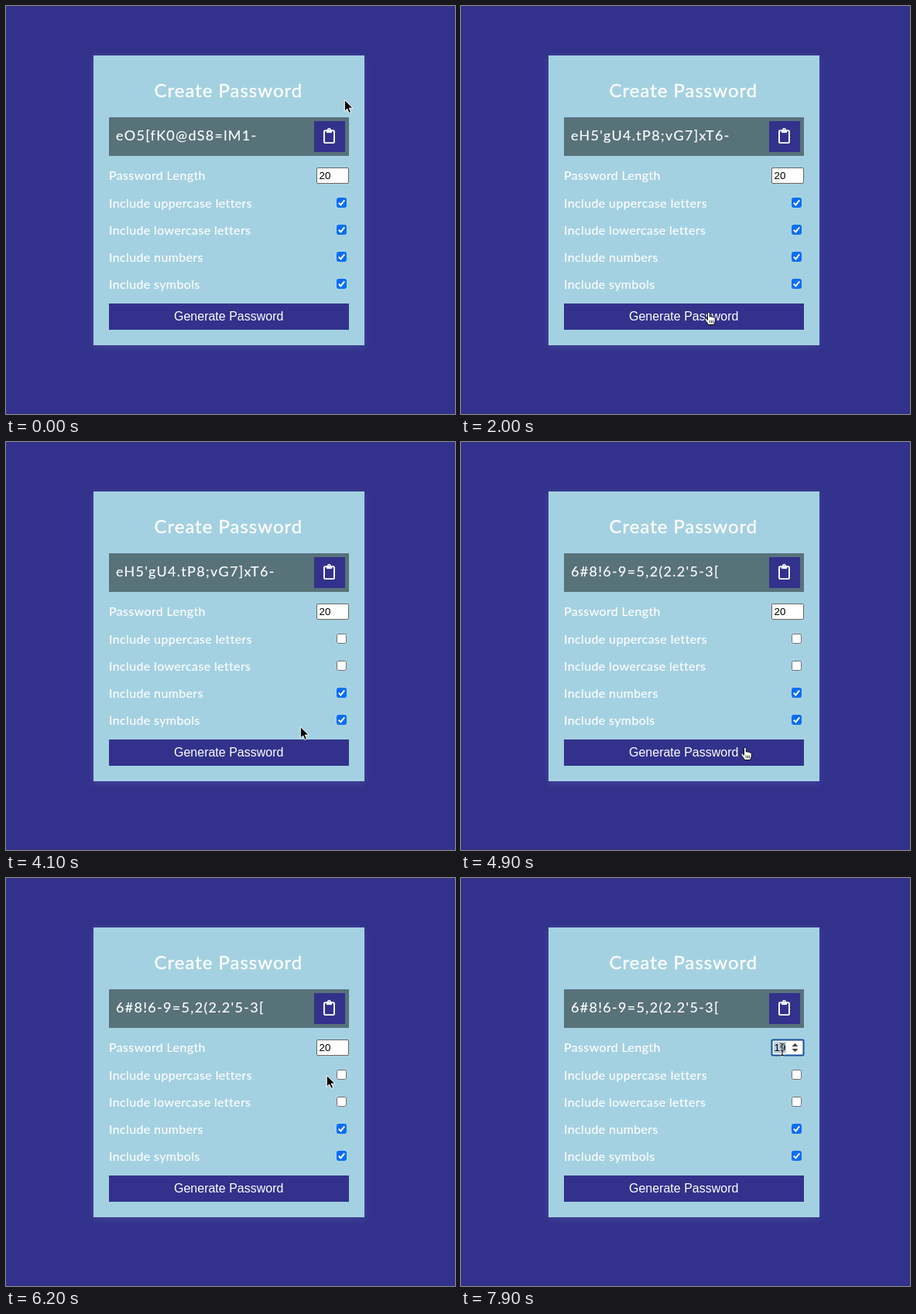
An HTML page that plays this animation: 580 by 528 pixels, repeating every 8 s.

```html
<!DOCTYPE html>
<html lang="en">
<head>
<meta charset="utf-8">
<title>Create Password</title>
<style>
  html, body { margin: 0; width: 100%; height: 100%; overflow: hidden; background: #32328c; }
  svg { display: block; }
  text { white-space: pre; }
  .card { fill: #a4d1e2; filter: drop-shadow(0 2px 5px rgba(255, 255, 255, .1)); }
  .navy { fill: #32328c; }
  .sans { font-family: Lato, "Open Sans", sans-serif; fill: #fff; }
  .title { font-size: 24px; letter-spacing: 1px; stroke: #fff; stroke-width: .35px; }
  .label { font-size: 16px; letter-spacing: .37px; stroke: #fff; stroke-width: .15px; }
  .password { font-size: 18px; letter-spacing: 1.3px; stroke: #fff; stroke-width: .15px; }
  .button { font: 16px "Liberation Sans", Arial, sans-serif; fill: #fff; }
  .number { font: 13.333px "Liberation Sans", Arial, sans-serif; fill: #000; }
</style>
</head>
<body>
<svg width="580" height="528" viewBox="0 0 580 528">
  <rect class="navy" width="580" height="528"/>
  <rect class="card" x="113" y="64" width="350" height="375"/>
  <text class="sans title" x="191.5" y="118">Create Password</text>

  <rect x="133" y="144" width="310" height="50" fill="#58727a"/>
  <text id="password" class="sans password" x="142" y="174"></text>
  <rect class="navy" x="398" y="149" width="40" height="40"/>
  <g fill="none" stroke="#fff">
    <rect x="411" y="161.3" width="13" height="15.8" rx="1.2" stroke-width="1.9"/>
    <path d="M414 162.6h7" stroke-width="3"/>
    <circle cx="417.5" cy="160.2" r="1.7" stroke-width="1.6"/>
  </g>

  <g id="labels" class="sans label"></g>

  <rect id="field" x="401.5" y="209.5" width="41" height="20" rx="1.5" fill="#fff" stroke="#666"/>
  <rect id="selection" x="404" y="212" width="16" height="15" fill="#b9cfe4"/>
  <text id="number" class="number" x="404.5" y="224"></text>
  <g id="spinner">
    <rect id="spinHover" x="425" y="212" width="15" height="15" fill="#d9d9d9"/>
    <path d="M427.5 218l4-4.2 4 4.2zM427.5 221l4 4.2 4-4.2z" fill="#444"/>
  </g>

  <g id="boxes"></g>

  <rect class="navy" x="133" y="385" width="310" height="34"/>
  <text class="button" x="217" y="407">Generate Password</text>

  <g id="cursor">
    <path id="arrow" d="M.3 .5V15.2L3.7 12L6.1 17.4L8.6 16.3L6.2 11.1H11Z"
      fill="#000" stroke="#fff" stroke-width="1" stroke-linejoin="round"/>
    <g id="hand" fill="#fff" stroke="#000" stroke-linejoin="round" stroke-linecap="round">
      <path d="M-1.5 9V.6C-1.5-1.2 1.2-1.2 1.3.6V5.2C1.8 4.2 3.6 4.4 3.8 5.6C4.4 4.7 6.1 5 6.2 6.3C7 5.6 8.3 6.1 8.3 7.4V10.3C8.3 12 7.1 13 6.9 15.5H-.6C-1.4 13-4.7 10.2-5.2 8.4C-5.4 6.9-3.6 6.7-2.8 7.6Z"/>
      <path d="M1.3 10v3M3.5 10v3M5.6 10v3" stroke-width=".8"/>
    </g>
    <g id="beam" fill="none">
      <path d="M-3-8Q0-8 0-6Q0-8 3-8M0-6V6M-3 8Q0 8 0 6Q0 8 3 8M-1.5 2H1.5" stroke="#fff" stroke-width="2.4"/>
      <path d="M-3-8Q0-8 0-6Q0-8 3-8M0-6V6M-3 8Q0 8 0 6Q0 8 3 8M-1.5 2H1.5" stroke="#000" stroke-width="1.1"/>
    </g>
  </g>
</svg>
<script>
const LOOP = 8000, STEP = 100;
const $ = id => document.getElementById(id);

// [time, value]: each value holds until the next time
const passwords = [
  [0, "eO5[fK0@dS8=lM1-"],
  [1000, "iR1)eZ8*eV5(lJ6+mZ0@"],
  [1700, "eH5'gU4.tP8;vG7]xT6-"],
  [4700, "6#8!6-9=5,2(2.2'5-3["]
];

// [time, x, y] of the pointer's hot spot
const path = [
  [0, 437, 121], [150, 436, 124], [850, 321, 393], [1000, 320, 397],
  [2000, 320, 397], [2700, 429, 256], [3000, 429, 256],
  [3300, 430, 290], [3600, 430, 290], [4100, 380, 368],
  [4500, 367, 396], [5700, 367, 396], [6400, 425, 220],
  [6600, 423, 220], [7200, 423, 220], [7500, 415, 222], [8000, 415, 222]
];

const rows = [
  { y: 225, text: "Password Length" },
  { y: 261, text: "Include uppercase letters", press: 2900, off: 3000 },
  { y: 296, text: "Include lowercase letters", press: 3400, off: 3500 },
  { y: 331, text: "Include numbers" },
  { y: 366, text: "Include symbols" }
];

function add(parent, tag, attrs) {
  const el = document.createElementNS("http://www.w3.org/2000/svg", tag);
  for (const key in attrs) el.setAttribute(key, attrs[key]);
  return parent.appendChild(el);
}

rows.forEach((row, i) => {
  add($("labels"), "text", { x: 133, y: row.y }).textContent = row.text;
  if (!i) return;
  const top = row.y - 13;
  row.box = add($("boxes"), "rect", { x: 427.5, y: top + .5, width: 12, height: 12, rx: 2 });
  row.tick = add($("boxes"), "path", {
    d: `M429.8 ${top + 6.8}l2.6 2.6l4.8-6`, fill: "none", stroke: "#fff", "stroke-width": 2
  });
});

const show = (el, on) => el.setAttribute("visibility", on ? "visible" : "hidden");
const held = (table, t) => table.filter(([at]) => at <= t).pop()[1];

function pointerAt(t) {
  const i = path.findIndex((p, k) => k && t < p[0]);
  const [t0, x0, y0] = path[i - 1], [t1, x1, y1] = path[i];
  const u = (t - t0) / (t1 - t0), e = u * u * (3 - 2 * u);
  return [x0 + (x1 - x0) * e, y0 + (y1 - y0) * e];
}

const inside = (x, y, l, t, r, b) => x >= l && x <= r && y >= t && y <= b;

function draw(t) {
  const [x, y] = pointerAt(t);
  const overField = inside(x, y, 401, 209, 443, 230);
  const onText = overField && x < 421;
  const onButton = inside(x, y, 133, 385, 443, 419) || inside(x, y, 398, 149, 438, 189);
  const focused = t >= 6700;

  $("password").textContent = held(passwords, t);
  $("number").textContent = t < 6800 ? "20" : "19";
  $("field").setAttribute("stroke", focused ? "#174e9f" : "#666");
  $("field").setAttribute("stroke-width", focused ? 2 : 1);
  show($("selection"), t >= 7700);
  show($("spinner"), overField || focused);
  show($("spinHover"), overField && !onText);
  if (!overField && !focused) show($("spinHover"), false);

  for (const { box, tick, press, off } of rows) {
    if (!box) continue;
    const on = !(t >= off);
    const blue = t >= press ? "#0058c4" : "#0b6df5";
    box.setAttribute("fill", on ? blue : "#fff");
    box.setAttribute("stroke", on ? blue : "#707070");
    show(tick, on);
  }

  $("cursor").setAttribute("transform", `translate(${Math.round(x)} ${Math.round(y)})`);
  show($("hand"), onButton);
  show($("beam"), onText);
  show($("arrow"), !onButton && !onText);
}

const start = performance.now();
function tick() {
  const t = (performance.now() - start) % LOOP;
  draw(Math.floor(t / STEP) * STEP);
  requestAnimationFrame(tick);
}
tick();
</script>
</body>
</html>
```
